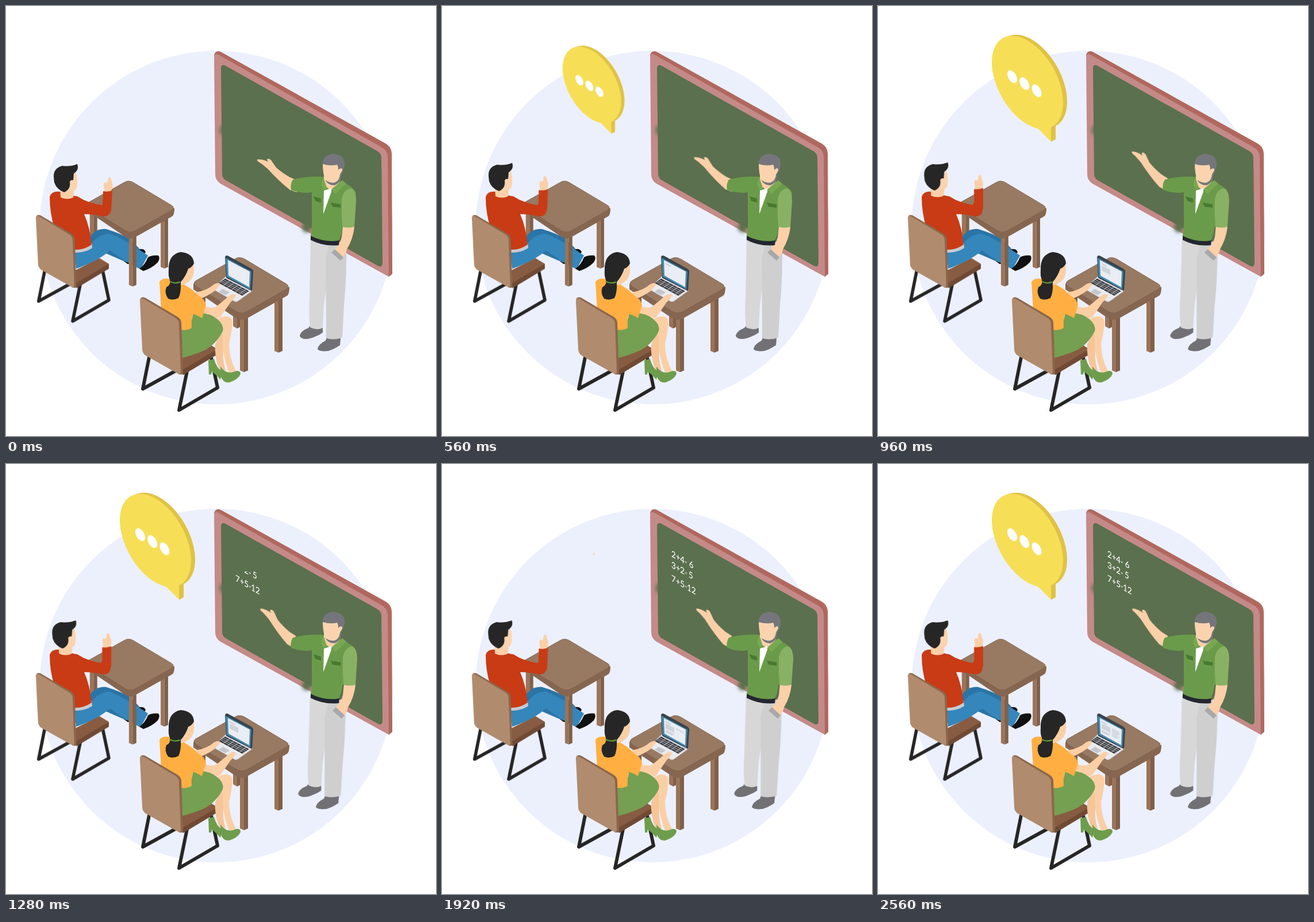
An HTML page that plays this animation: 748x748 px, repeating every 2.68 s.

```html
<!DOCTYPE html>
<html lang="en">
<head>
<meta charset="utf-8">
<title>Classroom</title>
<style>
html, body { margin: 0; width: 100%; height: 100%; overflow: hidden; background: #fff; }
svg { display: block; width: 100vw; height: 100vh; }
.anim { animation: 2680ms linear infinite; }
.bubble { animation-name: bubble; transform-origin: 264px 157px; }
.wipe { animation-name: wipe; }
.point { animation-name: point; transform-origin: 498px 310px; }
.stance { animation-name: stance; transform-origin: 0 410px; }
.side { animation-name: side; }
.nod { animation-name: nod; }
.wave { animation-name: wave; transform-origin: 175px 358px; }
.head, .photo, .para1, .para2 { animation-timing-function: step-end; }
.head { animation-name: show1; }
.photo { animation-name: show2; }
.para1 { animation-name: show3; }
.para2 { animation-name: show4; }
@keyframes bubble {
  0%, 5.6% { transform: scale(0); }
  24.25%, 53.36% { transform: scale(1); }
  72%, 72.76% { transform: scale(0); }
  91.4%, 100% { transform: scale(1); }
}
@keyframes wipe {
  0%, 41.8% { transform: none; }
  53.4%, 100% { transform: translateY(-80px); }
}
@keyframes point {
  0% { transform: none; }
  10% { transform: translate(0, 0) rotate(.5deg); }
  20.9% { transform: translate(-.5px, -1px) rotate(2.7deg); }
  35.8% { transform: translate(-3px, -4.5px) rotate(9.5deg); }
  44%, 100% { transform: translate(-3px, -5.5px) rotate(10.2deg); }
}
@keyframes stance {
  0%, 21% { transform: none; }
  35.8%, 100% { transform: translateX(-1.3px) skewX(-.5deg); }
}
@keyframes side {
  0%, 21% { transform: none; }
  37%, 100% { transform: translateX(2px); }
}
@keyframes nod {
  0% { transform: none; }
  20.9% { transform: translate(-2px, -2px); }
  34%, 100% { transform: translate(-2.7px, -3px); }
}
@keyframes wave {
  0% { transform: none; }
  20.9% { transform: translateY(-2px) rotate(-1deg); }
  35.8% { transform: translateY(-4px) rotate(-3.2deg); }
  47.8% { transform: translateY(-3.6px) rotate(-2.6deg); }
  61.2% { transform: translateY(-1px) rotate(-.8deg); }
  68% { transform: none; }
  82%, 100% { transform: translateY(-4px) rotate(-3.2deg); }
}
@keyframes show1 { 0% { opacity: 0; } 15%, 100% { opacity: 1; } }
@keyframes show2 { 0% { opacity: 0; } 30%, 100% { opacity: 1; } }
@keyframes show3 { 0% { opacity: 0; } 52%, 100% { opacity: 1; } }
@keyframes show4 { 0% { opacity: 0; } 72%, 100% { opacity: 1; } }
</style>
</head>
<body>
<svg viewBox="0 0 748 748">
<defs>
  <clipPath id="chalk"><rect class="anim wipe" x="385" y="228" width="75" height="100"/></clipPath>
  <filter id="blur"><feGaussianBlur stdDeviation="3"/></filter>

  <g id="deskBack">
    <path fill="#9b7459" d="M333 490h7v60h-7zM395 510h7v51l-7-4z"/>
    <path fill="#80604a" d="M340 490h7v60h-7zM402 510h6v48l-6 3z"/>
  </g>
  <g id="desk">
    <path fill="#9b7459" d="M407 530h7v107l-7-3zM467 500h7v103l-7-3z"/>
    <path fill="#80604a" d="M414 530h7v104l-7 3zM474 500h7v100l-7 3z"/>
    <path fill="#866650" d="M326 483V493L400 543Q410 549 420 543L489 504Q493 501 493 489Z"/>
    <path fill="#987962" stroke="#7a5d49" stroke-width=".8" d="M330 478L398 440Q406 435 415 440L487 483Q495 488 487 493L420 531Q410 537 400 531L331 488Q324 483 330 478Z"/>
  </g>

  <g id="seat">
    <path fill="none" stroke="#262626" stroke-width="6" stroke-linecap="round" stroke-linejoin="round"
      d="M249 611L238 666L298 633M315 635L301 703L368 664L357 612"/>
    <path fill="#704a34" d="M303 618L368 597V606L308 642Z"/>
    <path fill="#875c42" d="M300 612L350 586L368 597L307 633Z"/>
  </g>
  <g id="back">
    <path fill="#8c664b" d="M234 508Q238 505 243 508L299 541Q305 545 305 552L308 641L301 641Z"/>
    <path fill="#b08b6e" d="M233 514Q232 506 239 509L294 542Q301 546 301 553L304 636Q304 643 298 639L243 608Q237 604 237 597Z"/>
  </g>
</defs>

<circle cx="366" cy="385.500" r="307.500" fill="#ecf0fd"/>

<!-- blackboard -->
<path fill="#b0685e" d="M362 86Q364 76 374 80L660 239Q671 245 671 258L672 466L666 471Z"/>
<path fill="#c48a88" d="M362 91Q362 80 370 85L654 246Q664 252 664 263L666 471L373 309Q364 303 364 293Z"/>
<path fill="#5b704e" d="M374 109Q374 100 382 104L647 253Q653 257 653 265L655 446Q655 456 647 452L382 303Q376 299 376 292Z"/>
<g fill="#5b704e" filter="url(#blur)">
  <ellipse cx="376" cy="216" rx="4" ry="8"/>
  <ellipse cx="523" cy="385" rx="8" ry="9"/>
</g>
<g clip-path="url(#chalk)" fill="#fff" font-family="Lato, sans-serif" font-size="15.500" font-weight="500">
  <text transform="matrix(.85 .48 0 1 399 161)">2+4<tspan font-size="9" dy="-1.500">=</tspan><tspan dx="4" dy="1.500">6</tspan></text>
  <text transform="matrix(.85 .48 0 1 399 180)">3+2<tspan font-size="9" dy="-1.500">=</tspan><tspan dx="3" dy="1.500">5</tspan></text>
  <text transform="matrix(.85 .48 0 1 399 203.500)">7+5<tspan font-size="9" dy="-1.500">=</tspan><tspan dy="1.500">12</tspan></text>
</g>

<!-- speech bubble -->
<g class="anim bubble">
  <g fill="#dfc246">
    <ellipse transform="matrix(1 .57 0 1 267 131)" rx="62" ry="73"/>
    <ellipse transform="matrix(1 .57 0 1 263.500 132)" rx="62" ry="73"/>
    <path d="M301 236L309 232V200L299 203Z"/>
  </g>
  <g fill="#f7de57">
    <ellipse transform="matrix(1 .57 0 1 260 133)" rx="62" ry="73"/>
    <path d="M274 209L301 236V205Z"/>
  </g>
  <g fill="#fff">
    <ellipse transform="matrix(1 .57 0 1 233.500 123)" rx="8.500" ry="10"/>
    <ellipse transform="matrix(1 .57 0 1 254.700 135)" rx="8.500" ry="10"/>
    <ellipse transform="matrix(1 .57 0 1 276 147.500)" rx="8.500" ry="10"/>
  </g>
</g>

<!-- teacher -->
<g class="anim stance">
  <g fill="#717175">
    <path d="M511 573Q513 565 526 560L530 555L551 560V568Q546 572 538 575Q528 580 518 579Q511 577 511 573Z"/>
    <path d="M542 596Q544 588 556 582L558 576L582 578L581 590Q575 594 569 597Q559 602 549 600Q542 599 542 596Z"/>
  </g>
  <path fill="#d7d7d7" d="M530 404L580 412L560 470L553 520L551 560Q540 565 529 559Q526 535 528 505Z"/>
  <path fill="#cfcfcf" d="M556 440L562 414L592 408Q593 470 588 520L585 577Q570 582 557 578Z"/>
</g>
<g class="anim side">
  <path fill="#fbd0a8" d="M586 382L606 384Q604 405 593 423Q590 438 580 440Q570 433 572 423Q581 415 584 402Z"/>
  <path fill="#a8a8aa" d="M566 429L572 423L587 437L582 443Z"/>
</g>
<path class="anim point" fill="#fbd0a8" d="M506 303L494 298Q480 290 470 281L461 268Q456 264 454 267L456 271Q445 266 437 267Q436 270 444 274L455 283Q475 305 494 320L506 324Z"/>
<path fill="#23262f" d="M530 398Q550 408 580 406L579 416Q553 419 530 407Z"/>
<path fill="#6a9b4a" d="M550 297Q520 296 499 302Q494 310 496 320Q515 327 532 324V360Q533 385 530 400Q555 412 579 408Q584 398 585 386L607 345L609 325Q605 314 580 304Z"/>
<path class="anim side" fill="#89b163" d="M584 335Q588 319 600 317Q609 321 609 340L606 384Q596 387 585 384Q583 360 584 335Z"/>
<path fill="#fbd0a8" d="M553 296L582 300Q576 317 566 320Q555 316 553 306Z"/>
<path fill="#fff" d="M553 321L566 317V323L552 362Z"/>
<path fill="#79a852" d="M585 303L592 309L573 327L566 319ZM552 298L548 309L553 321L558 316Z"/>
<path fill="#477a30" d="M535 331L548 335V342L538 339ZM565 342L582 345V351L568 349Z"/>
<path fill="#75767b" d="M551 278Q549 259 569 257Q589 259 589 274Q589 285 583 293L574 290Z"/>
<path fill="#75767b" d="M584 287Q584 308 571 312Q559 312 555 301L570 295Z"/>
<path fill="#fbd4af" d="M551 275Q565 279 576 276Q578 279 578 285Q585 279 585 286L581 293Q580 304 572 307Q563 309 555 302Q551 290 551 275Z"/>

<!-- boy at the far desk -->
<use href="#seat" transform="translate(-167 -112.600) scale(.94)"/>
<use href="#deskBack" transform="translate(-160.560 -98) scale(.92)"/>
<path fill="#111" d="M205 444L228 424Q240 420 243 428L233 441L212 449Z"/>
<path fill="#2a74a6" d="M140 412Q152 386 174 388Q198 395 215 405L232 422L210 446L150 420Z"/>
<path fill="#3586ba" d="M119 428L148 414Q162 396 180 396Q205 405 247 434L234 458Q205 444 181 425Q163 442 122 457Z"/>
<path fill="#111" d="M232 457Q242 450 247 437Q255 433 265 434Q269 438 264 446Q254 456 239 461Z"/>
<use href="#desk" transform="translate(-160.560 -98) scale(.92)"/>
<path fill="#c9cbcf" d="M118 418L149 412L150 421Q136 430 119 429Z"/>
<path fill="#c83b15" d="M76 332Q79 321 95 323Q115 330 124 331Q142 343 170 347L182 356Q180 366 170 366Q150 362 136 362Q146 385 149 415Q135 425 118 424V402L84 385Q76 360 76 332Z"/>
<g class="anim wave">
  <path fill="#fbd0a8" d="M171 323L170 311Q171 304 176 308L178 299Q182 296 183 302L185 309Q187 316 182 323Z"/>
  <path fill="#c83b15" d="M169 322Q176 324 185 321L183 356Q180 364 172 366L160 358L168 345Z"/>
</g>
<g class="anim nod">
  <path fill="#fbd0a8" d="M94 314L119 316L117 333Q107 338 95 333Z"/>
  <path fill="#fbd4af" d="M108 298L119 286Q125 295 124 305Q125 320 118 321L103 322Z"/>
  <path fill="#262626" d="M83 298Q82 282 98 278Q112 280 124 275Q126 280 124 285Q121 290 118 291L117 303Q112 302 111 306Q113 319 101 324Q88 319 84 307Z"/>
</g>
<use href="#back" transform="translate(-167 -112.600) scale(.94)"/>

<!-- girl at the near desk -->
<use href="#seat"/>
<use href="#deskBack"/>
<use href="#desk"/>
<path fill="#f6c59a" d="M376 566L379 590Q375 612 382 634L372 635Q362 610 364 588Z"/>
<path fill="#fbcfa4" d="M366 546Q385 534 393 545Q395 560 388 587Q388 612 400 635L389 641Q379 615 377 592V566Z"/>
<path fill="#6d9d4c" d="M373 627Q384 643 400 635Q408 634 408 640Q404 650 388 655Q377 655 374 645ZM352 616L362 614Q366 630 376 636L373 650Q364 640 358 636L357 641H353Z"/>

<!-- laptop -->
<path fill="#e9ebef" stroke="#b9bcc2" stroke-width=".8" d="M383 470L429 495L404 513Q400 516 396 513L359 492Z"/>
<path fill="#3a3b40" d="M381 474L423 496L411 504L370 482Z"/>
<path fill="none" stroke="#c8cad0" stroke-width=".9" d="M378 476L420 498M375 478L417 500M373 480L414 502M389 478L378 486M396 482L385 490M403 486L392 494M410 489L399 497M417 493L406 501"/>
<path fill="#c3c6cc" d="M377 492L389 498L382 503L370 497Z"/>
<path fill="#39434d" d="M381 437Q382 432 387 435L427 457Q431 460 430 464L428 496L383 473Z"/>
<path fill="#4389ae" d="M382 438L427 462L425 493L384 471Z"/>
<path fill="#eaedf3" d="M386 442L424 462L423 489L387 469Z"/>
<g transform="matrix(1 .53 0 1 387 444)" fill="none" stroke="#aeb6c1" stroke-width="1.200">
  <path class="anim head" d="M2 3h9"/>
  <path class="anim photo" fill="#cfd3da" stroke="none" d="M2 6h15v9H2z"/>
  <path class="anim para1" d="M2 18h15M2 20.500h12M20 6h13"/>
  <path class="anim para2" d="M20 9h13M20 12h11M20 15h13M20 18h9"/>
</g>

<path fill="#fbcfa4" d="M330 498Q350 495 362 484Q370 480 373 484L364 495Q350 505 336 510Z"/>
<path fill="#fbcfa4" d="M344 521Q360 528 368 521L385 507Q392 499 400 502Q398 509 391 515L373 541Q360 549 338 540Z"/>
<path fill="#759f51" d="M300 566Q324 556 325 536Q350 530 368 545Q380 555 377 566Q365 589 345 599Q325 608 303 613Z"/>
<path fill="#ffaf42" d="M267 480Q271 472 287 475L305 482Q322 490 335 504Q346 510 348 520L341 543Q332 537 325 536Q322 545 323 560Q310 567 298 561L270 530Z"/>
<path fill="#fbcfa4" d="M314 444L326 447Q330 466 321 477Q313 485 302 486L303 465Z"/>
<path fill="#262626" d="M283 459Q282 432 304 428Q326 430 327 448Q323 455 317 457Q313 470 304 480Q305 498 300 508Q290 513 282 509Q275 499 279 489Q287 486 285 476Q282 470 283 459Z"/>
<path stroke="#5c8f3c" stroke-width="2.500" fill="none" d="M285 479Q293 484 303 480"/>
<use href="#back"/>
</svg>
</body>
</html>
```
